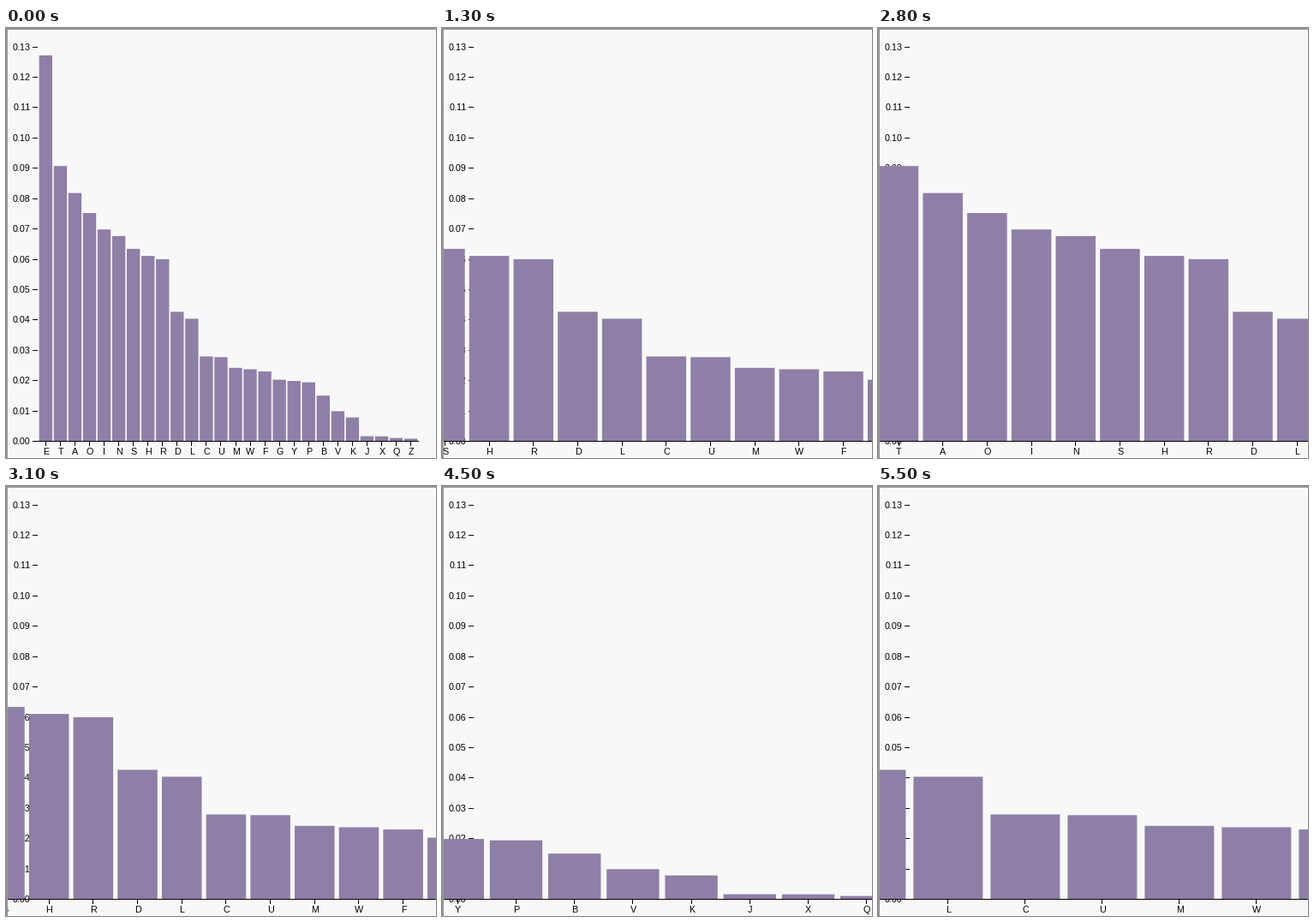
A matplotlib script for the animation above (6100 ms loop, 502x502 px).

```python
import matplotlib.pyplot as plt
import numpy as np
from matplotlib.animation import FuncAnimation
from matplotlib.patches import Rectangle

SIZE, DPI = 502, 64
FRAMES, INTERVAL = 61, 100
LEFT, RIGHT, BASE, HEIGHT = 37, 482, 482, 450
BAR, PAPER, BORDER = "#8e7fa6", "#f8f8f8", "#969696"

LETTERS = "ETAOINSHRDLCUMWFGYPBVKJXQZ"
SHARES = [.12702, .09056, .08167, .07507, .06966, .06749, .06327, .06094,
          .05987, .04253, .04025, .02782, .02758, .02406, .02360, .02288,
          .02015, .01974, .01929, .01492, .00978, .00772, .00153, .00150,
          .00095, .00074]
PER_UNIT = HEIGHT / max(SHARES)
STEP = (RIGHT - LEFT) / (len(LETTERS) + 0.1)
FONT = dict(family="Liberation Sans", size=10.8 * 72 / DPI, color="black",
            va="baseline", clip_on=True)

fig = plt.figure(figsize=(SIZE / DPI, SIZE / DPI), dpi=DPI, facecolor=PAPER)
ax = fig.add_axes([0, 0, 1, 1])
ax.set(xlim=(0, SIZE), ylim=(SIZE, 0))
ax.axis("off")


def rect(x, y, w, h, color, z):
    patch = Rectangle((x, y), w, h, facecolor=color, linewidth=0,
                      snap=False, zorder=z)
    return ax.add_patch(patch)


def zoom_about(left, pivot, factor):
    return pivot + (left - pivot) * factor


def view(n):
    """Scale and left end of the x range at frame n."""
    notches = round(np.interp(n, [6, 13, 44, 45, 47], [0, 8, 8, 10, 12]))
    k = 2 ** (0.2 * notches)
    if n < 17:
        return k, zoom_about(LEFT, 220.2, k)
    if n < 28:
        start = zoom_about(LEFT, 220.2, k)
        return k, min(LEFT, start + 71 * (n - 17))
    if n < 35:
        return k, np.interp(n, [28, 34], [-56.1, -624])
    far = RIGHT - (RIGHT - LEFT) * 2 ** 1.6
    if n < 45:
        rest = max(0, (40 - n) / 5)
        return k, far + (-727.9 - far) * rest ** 1.5
    zoomed = zoom_about(far, 108.3, k / 2 ** 1.6)
    return k, np.interp(n, [48, 55], [zoomed, -867.5])


# y axis, partly hidden by the bars when zoomed
for i in range(14):
    row = round(BASE + 0.2 - i * 0.01 * PER_UNIT)
    rect(31, row, 6, 1, "black", 1)
    ax.text(28.7, row + 4, f"{i / 100:.2f}", ha="right", zorder=1, **FONT)

bars = [rect(0, BASE - v * PER_UNIT, 1, v * PER_UNIT, BAR, 2) for v in SHARES]
ticks = [rect(0, BASE, 1, 6, "black", 3) for _ in LETTERS]
names = [ax.text(0, 498, c, ha="center", zorder=3, **FONT) for c in LETTERS]
axis = rect(LEFT, BASE, RIGHT - LEFT, 1, "black", 3)

rect(0, 0, SIZE, 2, BORDER, 5)
rect(0, 0, 2, SIZE, BORDER, 5)


def draw(n):
    k, left = view(n)
    step = STEP * k
    axis.set_x(round(left))
    axis.set_width(round((RIGHT - LEFT) * k))
    for i, (bar, tick, name) in enumerate(zip(bars, ticks, names)):
        center = left + step * (i + 0.55)
        bar.set_x(center - 0.45 * step)
        bar.set_width(0.9 * step)
        tick.set_x(int(np.floor(center)))
        name.set_x(center + 0.3)
        shown = -10 < center < SIZE + 10
        tick.set_visible(shown)
        name.set_visible(shown)
    return [axis, *bars, *ticks, *names]


anim = FuncAnimation(fig, draw, frames=FRAMES, interval=INTERVAL,
                     repeat=True, repeat_delay=0, blit=False)
plt.show()
```
